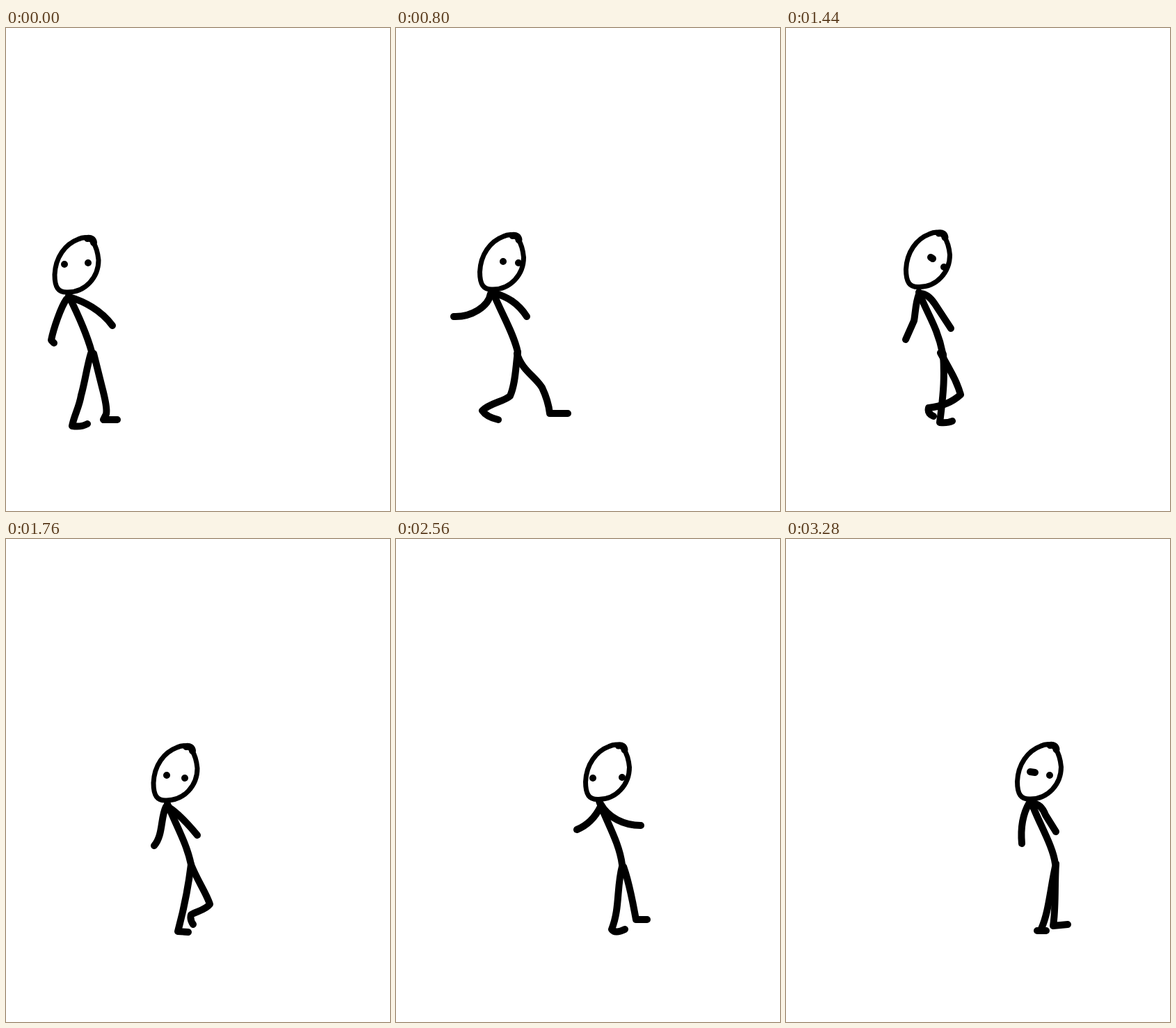
These frames come from a looping animation (552 by 693 pixels, 3.6 s). An HTML page:

```html
<!DOCTYPE html>
<html lang="en">
<head>
<meta charset="utf-8">
<title>Walking stick figure</title>
<style>
  html, body { margin: 0; width: 100%; height: 100%; overflow: hidden; background: #fff; }
  svg { display: block; width: 552px; height: 693px; }
  path { fill: none; stroke: #000; stroke-width: 10; stroke-linecap: round; stroke-linejoin: round; }
  #head .outline { stroke-width: 7; }

  /* Each pose is held in turn: --at is its start, the class its length. */
  .pose { visibility: hidden; animation: 3.6s step-end var(--at) infinite; }
  .long { animation-name: long; }
  .mid { animation-name: mid; }
  .short { animation-name: short; }
  @keyframes long { 0% { visibility: visible } 11.1111%, 100% { visibility: hidden } }
  @keyframes mid { 0% { visibility: visible } 8.8889%, 100% { visibility: hidden } }
  @keyframes short { 0% { visibility: visible } 6.6667%, 100% { visibility: hidden } }
</style>
</head>
<body>
<svg viewBox="0 0 552 693">
  <defs>
    <g id="head">
      <path class="outline" d="M126 307C124 300 112 299 104 303C85 310 71 329 70 354C70 372 75 380 89 379C114 379 133 358 133 333C132 322 129 313 125 307"/>
      <path d="M117 302Q125 301 126 308"/>
    </g>
  </defs>

  <!-- Paths run: torso, rear arm, front arm, rear leg, front leg, eyes. -->
  <g class="pose long" style="--at:0s">
    <use href="#head"/>
    <path d="M90 384Q114 432 123 464"/>
    <path d="M87 389C79 400 68 432 65 448L69 452"/>
    <path d="M91 386C112 392 137 405 153 427"/>
    <path d="M122 467C116 487 113 510 108 527C105 545 98 555 95 571Q108 573 117 568"/>
    <path d="M126 467L138 515Q146 545 144 554L140 562H160"/>
    <path d="M84 339h.01M118 337h.01"/>
  </g>
  <g class="pose long" style="--at:.4s">
    <use href="#head" x="25" y="-2"/>
    <path d="M115 381Q139 430 149 465"/>
    <path d="M112 385C106 408 100 420 83 428"/>
    <path d="M116 382C136 390 155 400 170 420"/>
    <path d="M149 466C142 490 138 515 134 530C126 548 116 552 112 563L132 565"/>
    <path d="M149 466C156 488 168 505 173 520C178 540 176 550 174 561L193 559"/>
    <path d="M119 337h.01M147 337h.01"/>
  </g>
  <g class="pose mid" style="--at:.8s">
    <use href="#head" x="50.5" y="-4"/>
    <path d="M139 378C150 407 169 437 175 465"/>
    <path d="M136 381C133 400 108 415 83 414"/>
    <path d="M141 380C160 386 175 394 188 414"/>
    <path d="M175 465C172 485 172 510 164 528C155 536 135 538 124 549Q130 558 147 562"/>
    <path d="M174 467C180 490 200 500 210 516Q219 535 221 553H247"/>
    <path d="M154 335h.01M176 337h.01"/>
  </g>
  <g class="pose mid" style="--at:1.12s">
    <use href="#head" x="77" y="-4"/>
    <path d="M167 379C178 408 195 437 200 465"/>
    <path d="M164 382C160 405 150 425 125 434"/>
    <path d="M168 381C186 388 203 402 213 423"/>
    <path d="M200 466C200 490 204 510 200 528C188 538 170 540 158 544Q160 556 174 560"/>
    <path d="M200 466C206 490 216 510 221 530Q223 550 221 562L244 561"/>
    <path d="M182 333h.01M202 340h.01"/>
  </g>
  <g class="pose mid" style="--at:1.44s">
    <use href="#head" x="102.5" y="-7.5"/>
    <path d="M191 379C203 410 218 430 225 466"/>
    <path d="M191 382C186 395 186 410 184 420L172 447"/>
    <path d="M193 381Q204 381 214 396L237 431"/>
    <path d="M222 466C235 490 245 505 251 526C240 536 225 543 205 545Q203 553 212 557"/>
    <path d="M226 468C228 500 227 520 221 566Q232 567 239 564"/>
    <path d="M208 329L211 331M227 343h.01"/>
  </g>
  <g class="pose mid" style="--at:1.76s">
    <use href="#head" x="142" y="-4"/>
    <path d="M232 380C244 410 260 437 266 467"/>
    <path d="M230 384C222 400 226 425 213 440"/>
    <path d="M234 385Q250 395 275 425"/>
    <path d="M266 467C262 500 256 530 247 563L262 564"/>
    <path d="M266 467C275 490 288 508 293 524C287 532 275 534 266 539Q264 546 269 553"/>
    <path d="M231 339h.01M257 343h.01"/>
  </g>
  <g class="pose short" style="--at:2.08s">
    <use href="#head" x="162.5" y=".5"/>
    <path d="M251 383C262 410 282 440 287 468"/>
    <path d="M250 386C236 405 240 425 218 442"/>
    <path d="M254 392Q263 402 307 418"/>
    <path d="M285 470C281 490 284 510 278 522C272 525 265 522 258 524C258 540 260 548 265 556"/>
    <path d="M288 470C294 488 312 512 316 535Q319 549 333 540"/>
    <path d="M252 347h.01M285 343h.01"/>
  </g>
  <g class="pose short" style="--at:2.32s">
    <use href="#head" x="182.5" y="-4"/>
    <path d="M271 380C283 408 301 437 306 467"/>
    <path d="M271 384C262 405 263 420 253 430"/>
    <path d="M273 384C285 400 305 408 328 414"/>
    <path d="M306 468C300 495 300 525 290 545Q285 555 290 559L302 560"/>
    <path d="M307 468C314 490 322 520 322 546H333"/>
    <path d="M267 345h.01M305 342h.01"/>
  </g>
  <g class="pose short" style="--at:2.56s">
    <use href="#head" x="202.5" y="-5.5"/>
    <path d="M292 376C302 405 321 435 325 467"/>
    <path d="M294 384Q282 408 260 417"/>
    <path d="M294 380C305 400 328 411 352 411"/>
    <path d="M325 470C317 500 322 530 310 560Q315 567 329 560"/>
    <path d="M327 470C336 495 340 520 345 546H361"/>
    <path d="M283 343h.01M325 342h.01"/>
  </g>
  <g class="pose short" style="--at:2.8s">
    <use href="#head" x="222.5" y="2"/>
    <path d="M312 383C325 412 342 440 346 468"/>
    <path d="M310 384C298 410 275 422 258 426"/>
    <path d="M319 386C329 418 334 433 353 435"/>
    <path d="M346 468C338 495 326 525 322 553Q335 559 350 558"/>
    <path d="M346 468C360 488 375 492 385 503C386 515 376 522 374 534H405"/>
    <path d="M315 343h2M345 343h2"/>
  </g>
  <g class="pose short" style="--at:3.04s">
    <use href="#head" x="242.5" y="-4"/>
    <path d="M332 380C344 409 361 437 366 467"/>
    <path d="M330 383C322 405 318 420 313 430"/>
    <path d="M334 383C345 400 355 412 372 426"/>
    <path d="M366 468C360 500 352 530 343 556L360 558"/>
    <path d="M367 468C380 488 393 505 398 520C402 535 401 545 401 554L426 553"/>
    <path d="M334 339h.01M362 342h.01"/>
  </g>
  <g class="pose mid" style="--at:3.28s">
    <use href="#head" x="262.5" y="-6"/>
    <path d="M352 376C362 405 384 440 387 466"/>
    <path d="M350 378C340 395 337 415 339 437"/>
    <path d="M354 379Q367 380 373 396L388 420"/>
    <path d="M388 466C380 500 378 535 367 559M361 562H374"/>
    <path d="M388 466C386 500 388 530 384 555L405 553"/>
    <path d="M351 334L358 335M379 339h.01"/>
  </g>
</svg>
</body>
</html>
```
